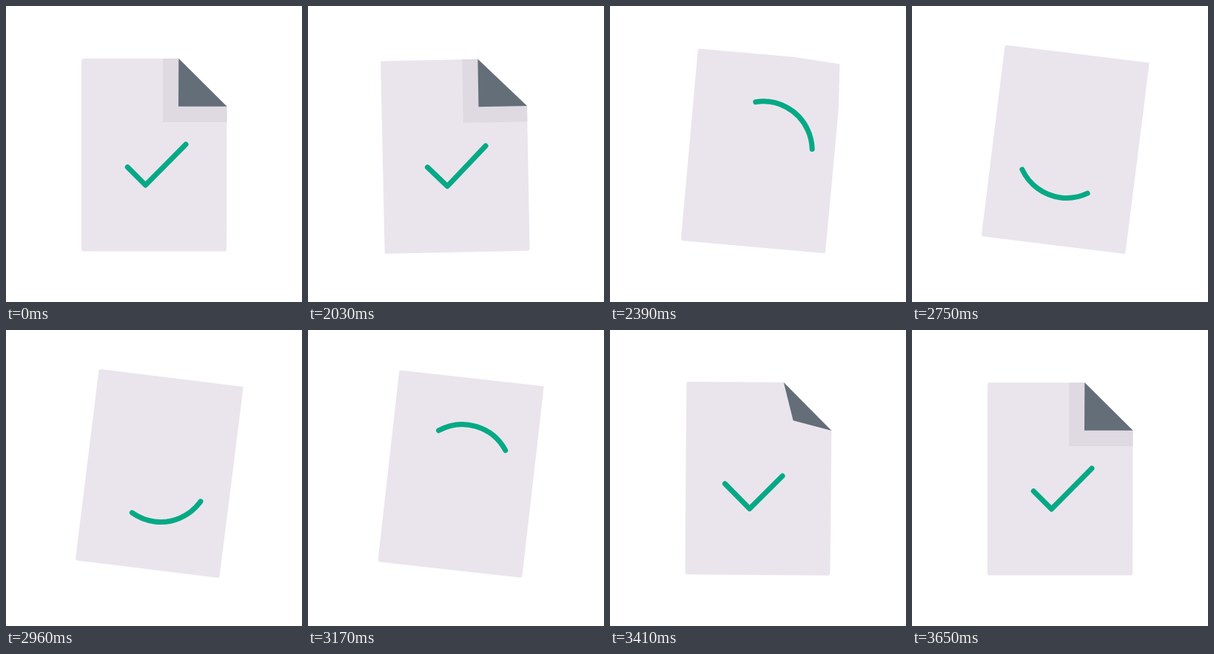
An HTML page for the animation above (3.74 s loop, 400 by 400 pixels).

```html
<!DOCTYPE html>
<html lang="en">
<head>
<meta charset="utf-8">
<title>Document check</title>
<style>
  html, body { margin: 0; width: 100%; height: 100%; overflow: hidden; background: #fff; }
  svg { display: block; width: 100%; height: 100%; }
</style>
</head>
<body>
<svg viewBox="0 0 400 400">
  <g id="sheet">
    <path id="page" fill="#eae5ec"/>
    <path id="shadow" fill="#dfd9e2" d="M212 71H233.3L298.5 135.7V157H212Z"/>
    <path id="flap" fill="#646e78"/>
    <path id="tick" fill="none" stroke="#05a985" stroke-width="7" stroke-linecap="round" stroke-linejoin="round"/>
  </g>
</svg>
<script>
  const LOOP = 3740, START = 2030, STEP = 30, END = 3650;
  const [sheet, page, shadow, flap, tick] =
    ['sheet', 'page', 'shadow', 'flap', 'tick'].map(id => document.getElementById(id));

  const smooth = x => (1 - Math.cos(Math.PI * x)) / 2;
  const easeIn = x => x * x;
  const easeOut = power => x => 1 - (1 - x) ** power;

  // Each track: [begin ms, end ms, from, to, easing]
  const tracks = {
    tilt: [
      [1980, 2140, 0, -5.5, smooth],
      [2140, 2590, -5.5, 7.05, easeOut(2.3)],
      [3061, 3526, 7.05, -4.7, easeIn],
      [3526, 3640, -4.7, 0, easeOut(2)]
    ],
    travel: [
      [1990, 2745, 0, 412, smooth],
      [2839, 3491, 412, 0, smooth]
    ],
    length: [
      [2390, 2745, 112.4, 104.3, smooth],
      [3170, 3550, 104.3, 112.4, smooth]
    ],
    unfold: [
      [2030, 2457, 0, 1, smooth],
      [3200, 3500, 1, 0, smooth]
    ],
    shade: [
      [2015, 2150, 1, 0, smooth],
      [3425, 3560, 0, 1, smooth]
    ]
  };

  function valueAt(track, t) {
    let value = track[0][2];
    for (const [begin, end, from, to, ease] of track) {
      if (t < begin) break;
      value = from + (to - from) * ease(Math.min(1, (t - begin) / (end - begin)));
    }
    return value;
  }

  // One full turn of the ring, a bend, then the two arms of the tick
  const ring = { x: 202, y: 200.3, r: 66.2 };
  const ringPoint = deg => {
    const a = deg * Math.PI / 180;
    return `${ring.x + ring.r * Math.cos(a)} ${ring.y + ring.r * Math.sin(a)}`;
  };
  const arcTo = deg => `A${ring.r} ${ring.r} 0 0 0 ${ringPoint(deg)}`;
  tick.setAttribute('d', `M${ringPoint(-150)}${arcTo(90)}${arcTo(-30)}${arcTo(-150)}` +
    'C138 178.8 139 192.5 150 203.5L188.5 242L243 187');
  const pathLength = tick.getTotalLength();

  function draw(t) {
    const at = name => valueAt(tracks[name], t);
    const unfold = at('unfold'), length = at('length');
    const apex = `L${233 + 65.5 * unfold} ${135.7 - 64.7 * unfold}`;
    const open = unfold > 0.5;

    sheet.setAttribute('transform', `rotate(${at('tilt')} 263 254)`);
    page.setAttribute('d', `M105 71H233.3${open ? apex : ''}L298.5 135.7` +
      'L298 328.5Q298 331.5 295 331.5H105Q102 331.5 102 328.5V74Q102 71 105 71Z');
    flap.setAttribute('d', open ? '' : `M233.3 71${apex}L298.5 135.7Z`);
    shadow.setAttribute('opacity', at('shade'));
    tick.setAttribute('stroke-dasharray', `${length} 2000`);
    tick.setAttribute('stroke-dashoffset', at('travel') + length - pathLength);
  }

  function frame() {
    const t = (performance.now() - origin) % LOOP;
    draw(t < START ? 0 : Math.min(END, START + Math.floor((t - START) / STEP) * STEP));
    requestAnimationFrame(frame);
  }

  const origin = performance.now();
  frame();
</script>
</body>
</html>
```
